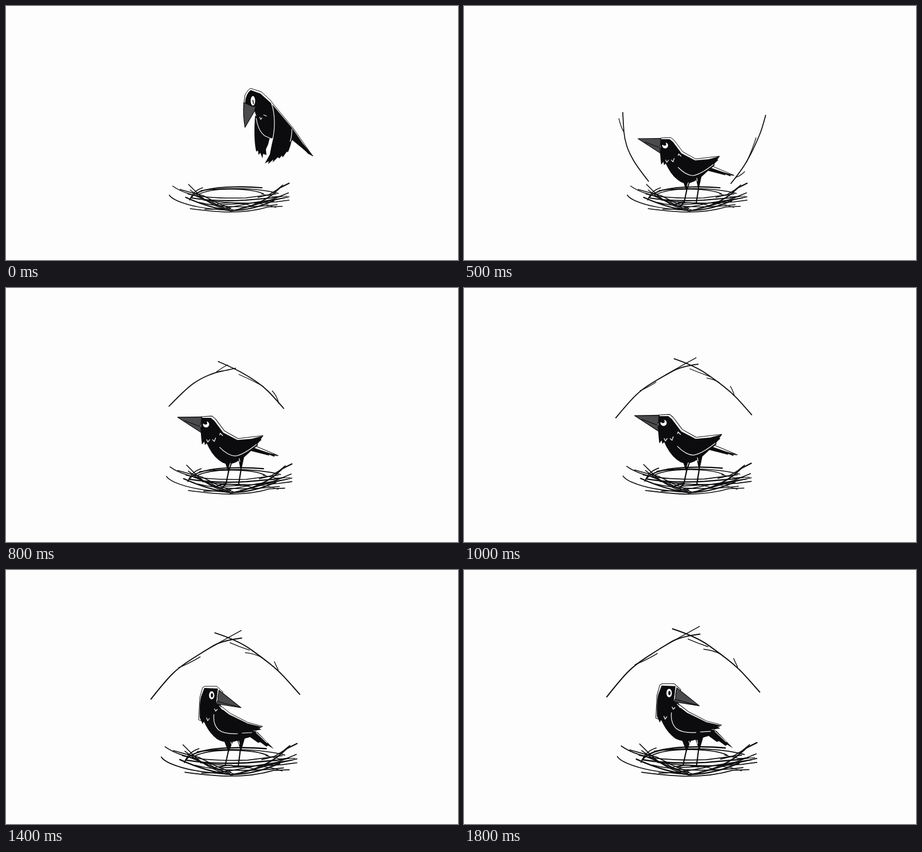
These frames come from a looping animation (800x450 px, 2 s). An HTML page:

```html
<!DOCTYPE html>
<html lang="en">
<head>
<meta charset="utf-8">
<title>Crow and nest</title>
<style>
  html, body { margin: 0; width: 100%; height: 100%; overflow: hidden; background: #fdfdfd; }
  svg { display: block; width: 100vw; height: 100vh; }
  path { stroke-linecap: round; stroke-linejoin: round; }
  .ink { fill: #0c0c0e; }
  .rim { fill: #fdfdfd; stroke: #0c0c0e; stroke-width: 1; }
  .line { fill: none; stroke: #0c0c0e; stroke-width: 1.5; }
  .bold { stroke-width: 2.1; }
  .thin { stroke-width: 1.1; }
  .lit { fill: none; stroke: #fdfdfd; stroke-width: 1.2; }
  .white { fill: #fdfdfd; }
  .beak { fill: #4b4b4d; stroke: #0c0c0e; stroke-width: 1.2; }
  .pose { display: none; }
</style>
</head>
<body>
<svg viewBox="0 0 800 450">
  <g id="nest">
    <path class="line bold" d="M327 340C336 328 362 321 405 320.5C425 320 442 321 453 322"/>
    <path class="line" d="M340 334C354 327 376 324 402 324.500C430 325 446 328 456 333M345 327C380 322 440 321 482 332"/>
    <path class="line" d="M295 319Q306 327 322 332C346 338 366 352 396 361M322 333C350 340 388 341 424 340L478 333"/>
    <path class="line" d="M289 335Q292 340 303 345C326 355 352 359 394 362"/>
    <path class="line bold" d="M318 339C338 348 366 359 398 362.500C430 362 452 354 474 345"/>
    <path class="line" d="M323 316L336 329C350 344 370 356 397 363M308 325L326 330L349 336L372 348L398 359"/>
    <path class="line bold" d="M501 314L485 322L474 332C458 345 432 357 398 363"/>
    <path class="line" d="M490 317L479 326L466 334L446 339M500 331L478 340C458 348 438 354 414 359"/>
    <path class="line bold" d="M328 340C352 344 388 346 424 344L470 340L488 337"/>
    <path class="line" d="M501 344L478 347C440 350 392 350 350 344M501 338L470 345C440 350 410 350 384 352"/>
    <path class="line" d="M489 355L464 356C444 362 420 365 396 365C372 365 350 362 326 359"/>
    <path class="line" d="M352 360C380 361 412 354 440 348L493 340M342 348C378 357 430 358 480 352"/>
    <path class="line" d="M325 344C330 332 336 326 348 322M326 326L341 337L358 346L384 356"/>
    <path class="line thin" d="M359 343L378 355L402 361M440 349L462 352L478 357M370 352C394 346 416 347 440 356M452 333L474 338L498 337"/>
  </g>
  <g id="twigs"></g>

  <g class="pose" id="hover">
    <path class="rim" d="M421 173L423 158Q428 148 433 146L452 152L468 167L474 175L508 216L543 266L505 236L470 190Z"/>
    <path class="ink" d="M441 194C439 215 439 242 443 258L446 256L447 264L450 260L454 270L455 262L461 264L460 254L464 245L467 233L455 206Z"/>
    <path class="ink" d="M423 172Q424 156 433 149L450 155L468 171L476 180L507 217L525 243L544 266L539 264L535 262L530 257L507 237L505 240L485 232L466 235Q452 228 447 208L440 186Z"/>
    <path class="ink" d="M472 176C478 192 478 217 470 244L467 263L458 279L465 275L464 280L473 272L472 277L481 268L484 270L488 265L490 268L497 258L499 259C505 246 508 232 506 216Z"/>
    <path class="lit" d="M470 173C476 190 477 217 471 240L467 258M443 199Q446 221 458 230L469 235M506 218Q506 230 503 240M449 197L451 201L453 198M456 193L461 195"/>
    <path class="beak" d="M421 171L436 178L442 178L440 186L423 215Q419 192 421 171Z"/>
    <ellipse class="white" cx="437" cy="168" rx="4" ry="8.500"/>
    <path class="line" d="M437 167L438 173"/>
  </g>

  <g class="pose" id="flap">
    <path class="rim" d="M382 51L373 48Q350 56 341 82Q339 108 348 124L360 130L372 90Z"/>
    <path class="ink" d="M383 54L376 56L381 50L372 51Q351 58 344 84Q341 106 350 124L347 123L354 131L353 128L360 137L384 142L392 110L374 84L374 72Z"/>
    <path class="ink" d="M396 40L408 44L404 37L413 42L411 36L421 41L416 33C444 39 464 61 470 82L467 54C477 68 482 88 478 106L472 123L476 122L470 128L474 129L465 132L470 134L459 136L463 139L434 139L441 145L481 188L474 184L470 184L434 159Q421 160 404 158Q391 155 384 140L375 124L380 96L399 101Q421 102 427 88C428 68 417 49 396 40Z"/>
    <path class="lit" d="M470 78Q475 94 470 110M398 101L400 107L397 110L401 113M407 110Q424 111 434 101M437 107Q441 102 442 96M378 128L380 136L383 132L386 138L388 134M434 140L477 183"/>
    <path class="rim" d="M354 104L358 90L369 82L382 89L399 99L394 104L372 92Z"/>
    <path class="ink" d="M356 104Q360 90 369 86L381 92L397 102L392 126L376 125Z"/>
    <path class="beak" d="M354 103L366 115L376 118L374 126L360 159Q355 130 354 103Z"/>
    <path class="lit" d="M355.500 104L357 130L359.500 153"/>
    <ellipse class="white" cx="371" cy="106" rx="4" ry="6.500"/>
    <path class="line thin" d="M371 104L372 110"/>
  </g>

  <g class="pose" id="stand">
    <path class="line bold" d="M394 327L390 346M390 347L382 348L376 351M390 348L384 353M415 324L411 349L407 350M411 349L415 350"/>
    <path class="ink" d="M388 311L400 312L394 330ZM410 303L421 299L415 327Z"/>
    <path class="rim" d="M348 234L366 233L372 238L387 258L410 271L452 266L440 284L478 300L435 289L380 280Z"/>
    <path class="ink" d="M348 236L364 236L370 241L385 261L409 273.500L433 271.500L453 266L448 272L450 273L442 280L444 282L438 287L478 301L471 300L472 302L462 298L463 300L432 292L421 302L407 311Q394 317 384 312Q370 304 361 287L357 279L354 282L353 276L349 281L348 272L347 260Z"/>
    <path class="lit" d="M379 286Q393 300 405 300.500Q418 299 441 281M357 273L359 277L362 273M367 273L370 276L372 270M379 265L380 262L384 266M397 313L395 319M412 305L413 310"/>
    <path class="beak" d="M308 235L348 234.500Q349 242 346 249L348 261Z"/>
    <path class="line thin" d="M320 241L344 250"/>
    <circle class="white" cx="356" cy="247" r="5.200"/>
    <path class="ink" d="M349 241L357 241L358 246Q355 249 352 246L349 246Z"/>
  </g>

  <g class="pose" id="blink">
    <path class="line bold" d="M396 324L389 346L380 349M415 320L411 349M405 350L415 349"/>
    <path class="line" d="M390 347L399 347L405 350"/>
    <path class="ink" d="M387 307L401 309L396 328ZM410 301L425 291L416 324Z"/>
    <path class="rim" d="M344 229L361 221L367 223L386 249L413 262L428 261L432 264L459 255L438 277L487 295L440 285L380 270Z"/>
    <path class="ink" d="M344 231L359 224L365 228L383 250L411 264L434 265L459 255L452 264L454 265L446 272L447 275L438 279L487 295L478 295L479 297L469 294L434 288L424 294L411 307Q396 314 383 308Q367 300 359 283L356 277L352 281L350 274L347 277L345 254Z"/>
    <path class="lit" d="M373 260Q374 272 381 283Q389 294 405 292Q427 288 445 271M354 277L356 280M364 267L367 271L368 265L371 268M378 252L379 247L383 253M397 311L399 319M412 304L412 310M351 238Q355 243 361 240"/>
    <path class="beak" d="M303 250L344 230Q349 239 345 246L346 254Z"/>
    <path class="line thin" d="M312 249L345 246"/>
  </g>

  <g class="pose" id="turn">
    <path class="line bold" d="M394 319L388 346L378 350M415 317L411 348M405 348L415 349"/>
    <path class="line" d="M388 346L399 346L405 349"/>
    <path class="ink" d="M386 303L402 303L394 323ZM409 301L423 297L416 321Z"/>
    <path class="rim" d="M341 265L343 226L348 208L352 206L373 206L384 216L378 239L397 254L428 270L454 277L440 286L380 280Z"/>
    <path class="ink" d="M351 209L375 210L372 237L380 239L382 246L395 256L428 272L453 278L447 280L452 283L436 285L445 287L474 317L464 311L461 313L450 305L446 306L432 296L418 300L404 304Q386 307 374 300Q361 290 354 276L350 268L348 273L345 266L343 262Q342 239 345 225Z"/>
    <path class="lit" d="M368 256Q366 273 376 283Q386 291 410 290M418 289L435 288M355 262L357 267L360 263M369 246L371 250L374 247M378 241L383 247M398 305L400 311M412 303L413 309M443 288L462 306"/>
    <path class="beak" d="M377 213L416 244L372 237Q376 231 375 225Z"/>
    <path class="line thin" d="M375 233L413 243"/>
    <ellipse class="white" cx="364" cy="222" rx="4.700" ry="7.200"/>
    <ellipse class="ink" cx="364.500" cy="222" rx="2" ry="3.700"/>
  </g>
</svg>
<script>
const LOOP = 2000, STEP = 100, CX = 396, CY = 363;
const $ = id => document.getElementById(id);

// Camera zoom over time: [ms, zoom]
const ZOOM = [[0, 1], [500, 1], [800, 1.047], [1200, 1.093], [1400, 1.133], [1800, 1.165]];
// Twig progress: 0 thrown up, 1 meeting, 2 settled as a roof
const FLIGHT = [[400, -0.1], [500, 0], [800, 1], [900, 1.5], [1000, 1.8], [1200, 2]];
// Pose start, element, zoom it is drawn at, extra transform
const POSES = [
  [0, 'hover', 1, ''],
  [100, 'hover', 1, 'translate(-24 -42)'],
  [200, 'flap', 1, ''],
  [400, 'stand', 1, 'translate(0 21) scale(1 .94)'],
  [500, 'stand', 1, ''],
  [1100, 'blink', 1.093, ''],
  [1300, 'turn', 1.133, '']
];

// Strokes are split by "/"; the first point is the free lower end.
const KEY_ZOOM = [1, 1.047, 1.093];
const LEFT = [
  '327,311 308,287 292,260 284,235 282,210 281,188/282,222 277,212 274,199/308,287 308,287 308,287',
  '288,210 318,179 343,161 372,149 390,146 407,142/372,149 384,140 393,136/318,179 318,179 318,179',
  '261,234 284,205 308,180 350,153 383,133 417,129/350,153 383,134 416,116/308,180 326,173 346,161'
];
const RIGHT = [
  '472,315 492,290 508,262 520,236 528,216 534,193/500,277 512,250 517,233/480,304 490,301 497,293/508,262 508,262 508,262',
  '492,214 474,193 455,174 430,157 403,142 375,130/455,174 433,162 412,153/483,205 480,192 471,182/455,174 455,174 455,174',
  '516,226 497,204 478,184 452,163 410,133 370,120/430,150 412,144 396,137/479,184 475,176 472,169/452,163 440,156 422,154'
];

const lerp = (a, b, k) => a + (b - a) * k;

function track(keys, t) {
  let i = 0;
  while (i < keys.length - 2 && t > keys[i + 1][0]) i++;
  const [t0, a] = keys[i], [t1, b] = keys[i + 1];
  return lerp(a, b, Math.min(1, Math.max(0, (t - t0) / (t1 - t0))));
}

// Points as offsets in polar form around the free end
function parse(text, i) {
  const z = KEY_ZOOM[i];
  const strokes = text.split('/').map(s => s.split(' ').map(p => {
    const [x, y] = p.split(',').map(Number);
    return [(x - CX) / z + CX, (y - CY) / z + CY];
  }));
  const [bx, by] = strokes[0][0];
  return {
    base: [bx, by],
    strokes: strokes.map(s => s.map(([x, y]) =>
      [Math.hypot(x - bx, y - by), Math.atan2(y - by, x - bx)]))
  };
}

function smooth(p) {
  let d = `M${p[0]}`;
  for (let i = 1; i < p.length - 1; i++) {
    const end = i === p.length - 2 ? p[i + 1]
      : [(p[i][0] + p[i + 1][0]) / 2, (p[i][1] + p[i + 1][1]) / 2];
    d += `Q${p[i]} ${end}`;
  }
  return d;
}

function makeTwig(texts) {
  const keys = texts.map(parse);
  const paths = keys[0].strokes.map((_, i) => {
    const el = document.createElementNS('http://www.w3.org/2000/svg', 'path');
    el.setAttribute('class', 'line');
    el.style.strokeWidth = i ? 1.2 : 1.7;
    el.style.strokeLinecap = 'butt';
    $('twigs').append(el);
    return el;
  });
  return u => {
    const i = u < 1 ? 0 : 1, k = u - i, a = keys[i], b = keys[i + 1];
    const bx = lerp(a.base[0], b.base[0], k), by = lerp(a.base[1], b.base[1], k);
    paths.forEach((el, s) => el.setAttribute('d', smooth(a.strokes[s].map(([r, w], n) => {
      const [r2, w2] = b.strokes[s][n];
      const len = lerp(r, r2, k), ang = lerp(w, w2, k);
      return [bx + len * Math.cos(ang), by + len * Math.sin(ang)];
    }))));
  };
}

const twigs = [makeTwig(LEFT), makeTwig(RIGHT)];
const zoomBy = z => `translate(${CX} ${CY}) scale(${z}) translate(${-CX} ${-CY})`;

function draw(t) {
  const zoom = track(ZOOM, t);
  $('nest').setAttribute('transform', zoomBy(zoom));
  $('twigs').setAttribute('transform', zoomBy(zoom));
  $('twigs').style.display = t < 400 ? 'none' : 'inline';
  twigs.forEach(set => set(track(FLIGHT, t)));

  const [, id, z, extra] = POSES.filter(p => p[0] <= t).pop();
  document.querySelectorAll('.pose').forEach(el => {
    el.style.display = el.id === id ? 'inline' : 'none';
  });
  $(id).setAttribute('transform', `${zoomBy(zoom / z)} ${extra}`);
}

const start = performance.now();
let shown = -1;
function tick() {
  const now = (performance.now() - start) % LOOP;
  let t = Math.floor(now / STEP) * STEP;
  if (t === 300 || t === 1900) t -= STEP; // two held drawings
  if (t !== shown) draw(shown = t);
  requestAnimationFrame(tick);
}
tick();
</script>
</body>
</html>
```
